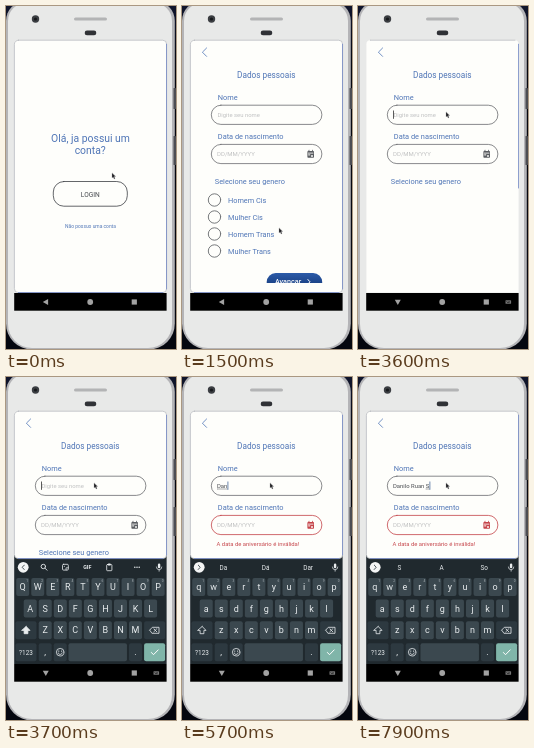
These frames come from a looping animation (170x343 px, 8 s). An HTML page with a canvas:

```html
<!DOCTYPE html>
<html lang="pt">
<head>
<meta charset="utf-8">
<style>
html, body { margin: 0; width: 100%; height: 100%; overflow: hidden; background: #05070f; }
canvas { display: block; width: 170px; height: 343px; }
</style>
</head>
<body>
<canvas></canvas>
<script>
const LOOP = 8000, STEP = 100;
const BLUE = '#4f75b6', INK = '#46494e', RED = '#c5444a', PAPER = '#fefefb', NAV = '#a2a2a2', KEY = '#e9edef';
const EDGE = '#7489c4';

const canvas = document.querySelector('canvas');
const ratio = window.devicePixelRatio || 1;
canvas.width = 170 * ratio;
canvas.height = 343 * ratio;
const c = canvas.getContext('2d');
c.scale(ratio, ratio);
c.lineCap = c.lineJoin = 'round';

function paint(fill, stroke, width = 0.8) {
  if (fill) { c.fillStyle = fill; c.fill(); }
  if (stroke) { c.strokeStyle = stroke; c.lineWidth = width; c.stroke(); }
}
function box(x, y, w, h, r, fill, stroke, width) {
  c.beginPath();
  c.roundRect(x, y, w, h, r);
  paint(fill, stroke, width);
}
function dot(x, y, r, fill, stroke, width) {
  c.beginPath();
  c.arc(x, y, r, 0, 7);
  paint(fill, stroke, width);
}
function path(points, fill, stroke, width) {
  c.beginPath();
  for (let i = 0; i < points.length; i += 2) c.lineTo(points[i], points[i + 1]);
  if (fill) c.closePath();
  paint(fill, stroke, width);
}
function text(s, x, y, size, color, align = 'left', weight = 400) {
  c.font = `${weight} ${size}px Roboto, sans-serif`;
  c.textAlign = align;
  c.fillStyle = color;
  c.fillText(s, x, y);
  return c.measureText(s).width;
}
function fade(x0, y0, x1, y1, ...colors) {
  const g = c.createLinearGradient(x0, y0, x1, y1);
  colors.forEach((color, i) => g.addColorStop(i / (colors.length - 1), color));
  return g;
}

// Latest value of a [time, value] list
const at = (list, t) => list.reduce((v, [when, next]) => t >= when ? next : v, null);

const typed = [[0, ''], [3900, 'D'], [4700, 'Da'], [5500, 'Dan'], [6100, 'Danil'], [6400, 'Danilo'],
  [6600, 'Danilo R'], [6800, 'Danilo Ru'], [7200, 'Danilo Rua'], [7400, 'Danilo Ruan'], [7600, 'Danilo Ruan S']];
const hints = [[4500, ['D', 'De', 'Do']], [5100, ['Da', 'Dá', 'Dar']], [5900, ['Dan', 'Dá', 'Dar']],
  [6400, ['Danilo', 'DANILO', 'danilo.prates']], [7200, ['Rua', 'Ruas', 'Ruan']],
  [7500, ['e', 'de', 'da']], [7800, ['S', 'A', 'So']]];
const route = [[100, 106, 167], [300, 114, 172], [500, 117, 184], [700, 111, 204], [900, 101, 220], [1100, 97, 222],
  [1600, 97, 222], [1700, 99, 174], [1800, 101, 128], [1900, 101, 128], [2100, 93, 113], [2300, 88, 106]];

function phone() {
  c.fillStyle = fade(0, 0, 0, 60, '#10152c', '#05070f');
  c.fillRect(0, 0, 170, 343);
  box(0, -5, 168.8, 348.5, [20, 20, 26, 26], '#b4b4b7');
  box(167.5, 82, 2.5, 21, 0.5, '#4c4d52');
  box(167.5, 130, 2.5, 29, 0.5, '#4c4d52');
  box(2, -3, 164, 345, [18, 18, 24, 24], '#e8e9e8');
  dot(29.5, 13, 3.7, '#3b3e42');
  dot(29.5, 13, 1.6, '#17191c');
  box(68, 11.5, 33, 3, 1.5, '#b3b4b5');
  box(78.7, 24.6, 11.6, 4.6, 2.3, '#303236');
}

function navBar(t) {
  c.fillStyle = '#000';
  c.fillRect(8.2, 287, 152.4, 17.7);
  c.save();
  c.translate(39.8, 296);
  c.rotate(t < 3200 ? 0 : t < 3300 ? -Math.PI / 4 : -Math.PI / 2);
  path([-3, 0, 2.3, -3, 2.3, 3], NAV);
  c.restore();
  dot(84.2, 296, 2.9, NAV);
  c.fillStyle = NAV;
  c.fillRect(125.7, 293.4, 5.2, 5.2);
  if (t >= 2800) {
    box(147.5, 294.2, 5.6, 3.6, 0.6, '#777');
    c.fillStyle = '#000';
    for (let i = 0; i < 3; i++) c.fillRect(148.5 + i * 1.4, 295, 0.6, 0.6);
    c.fillRect(149, 296.5, 2.6, 0.5);
  }
}

function welcome() {
  text('Olá, ja possui um', 84.5, 136, 10.4, BLUE, 'center');
  text('conta?', 84.2, 148.1, 10.4, BLUE, 'center');
  box(47.3, 175.5, 74, 24.7, 10.5, null, '#3d3f44');
  text('LOGIN', 84.3, 190.5, 6.6, INK, 'center');
  text('Não possuo uma conta', 84.5, 222.2, 4.93, BLUE, 'center');
}

function calendar(color) {
  box(125.4, 144.9, 6.6, 6.8, 0.8, color);
  path([126.9, 144.1, 126.9, 145], null, color, 0.8);
  path([130.5, 144.1, 130.5, 145], null, color, 0.8);
  c.fillStyle = PAPER;
  c.fillRect(126, 146.7, 5.4, 0.8);
  c.fillRect(126.2, 148.4, 2, 1);
  c.fillRect(129, 149.3, 2, 1.4);
}

function nameField(t) {
  box(29.3, 99.2, 110.6, 19.2, 9.6, null, '#6b6d70');
  const s = at(typed, t);
  if (!s) text('Digite seu nome', 35.5, 111, 5.9, '#bfc0c1');
  const w = s ? text(s, 35, 111, 5.9, INK) : 0;
  if (t >= 4200) {
    const last = s.slice(s.lastIndexOf(' ') + 1);
    const lw = c.measureText(last).width;
    path([35 + w - lw, 112, 35 + w, 112], null, '#56585c', 0.5);
  }
  if (t >= 2300 && (t < 2800 || t >= 3300)) {
    c.fillStyle = t < 3900 ? '#333' : '#4b6c9c';
    c.fillRect(35.2 + w, 104.5, 0.8, 8.3);
  }
}

function form(t) {
  const bad = t >= 4400;
  path([24.6, 42, 20.4, 46.2, 24.6, 50.4], null, BLUE, 0.8);
  text('Dados pessoais', 84.3, 71.8, 8.25, BLUE, 'center');
  text('Nome', 35.8, 94, 7.4, BLUE);
  nameField(t);
  text('Data de nascimento', 35.8, 133, 7.4, BLUE);
  box(29.3, 138.4, 110.6, 19.2, 9.6, null, bad ? RED : '#6b6d70');
  text('DD/MM/YYYY', 35, 150.2, 6, '#bfc0c1');
  calendar(bad ? RED : '#5a5d61');
  if (bad) text('A data de aniversário é inválida!', 34.5, 169, 5.9, RED);
  else text('Selecione seu genero', 32.8, 177.6, 7.4, BLUE);
  if (t >= 3600) return;
  ['Homem Cis', 'Mulher Cis', 'Homem Trans', 'Mulher Trans'].forEach((s, i) => {
    const y = 194 + i * 17;
    dot(32.5, y, 6.2, null, '#55585c');
    text(s, 46, y + 2.7, 7.35, BLUE);
  });
  c.save();
  c.beginPath();
  c.rect(80, 262, 65, 15);
  c.clip();
  box(84.7, 267, 55.5, 19, 9, fade(0, 267, 0, 280, '#2c5ba8', '#173d80'));
  text('Avançar', 93, 278.3, 7.2, '#fff', 'left', 500);
  path([125.8, 273.5, 128, 275.8, 125.8, 278.1], null, '#fff', 1);
  c.restore();
}

function toolbar(t) {
  const words = at(hints, t);
  dot(17.2, 190.3, 5.4, '#f4f5f5');
  const d = words ? 1 : -1;
  path([17.2 - d, 188.1, 17.2 + d, 190.3, 17.2 - d, 192.5], null, '#39444a', 0.9);
  box(151.9, 186.5, 2.4, 4.8, 1.2, KEY);
  c.beginPath();
  c.arc(153.1, 190, 2.7, 0, Math.PI);
  paint(null, KEY, 0.7);
  path([153.1, 192.8, 153.1, 194.2], null, KEY, 0.7);
  if (!words) {
    dot(37.3, 189.5, 2.2, null, KEY, 0.9);
    path([39, 191.2, 41, 193.2], null, KEY, 0.9);
    box(56.5, 187.3, 5.8, 5.8, 1, null, KEY);
    path([60, 193, 60, 190.8, 62.2, 190.8], null, KEY, 0.7);
    dot(58.3, 189.3, 0.5, KEY);
    text('GIF', 81.3, 192.3, 5.4, KEY, 'center', 700);
    box(100.7, 187.5, 5.2, 6.2, 0.7, null, KEY);
    box(102, 186.5, 2.6, 2, 0.5, KEY);
    for (let i = 0; i < 3; i++) dot(128.8 + i * 2.2, 190.3, 0.75, KEY);
    return;
  }
  words.forEach((s, i) => {
    const mail = s.includes('.');
    text(s, 41.3 + i * 42.4, mail ? 188.8 : 192.6, mail ? 5.5 : 6.4, KEY, 'center', mail ? 700 : 400);
    if (mail) text('@mail.test', 126, 194.8, 4.6, KEY, 'center');
  });
}

function key(x, y, w, label, size = 9, fill = '#3b484f') {
  box(x - w / 2, y - 9, w, 18, 2, fill);
  if (label) text(label, x, y + 3, size, KEY, 'center');
}

function keyboard(t) {
  const dark = '#2d3940';
  c.fillStyle = '#20292e';
  c.fillRect(8.2, 178, 152.4, 109);
  toolbar(t);
  [['qwertyuiop', 16.7, 210], ['asdfghjkl', 24.2, 231.5], ['zxcvbnm', 39.2, 253.3]].forEach(([row, x, y], r) => {
    [...row].forEach((ch, i) => {
      const kx = x + i * 15.05;
      key(kx, y, 13, t < 4000 ? ch.toUpperCase() : ch);
      if (!r) text((i + 1) % 10, kx + 4.5, y - 4.7, 3.2, '#aab2b6', 'center');
    });
  });
  key(20, 253.3, 21, '', 0, dark);
  path([20, 249.3, 24, 253.4, 21.9, 253.4, 21.9, 256.7, 18.1, 256.7, 18.1, 253.4, 16, 253.4],
    t < 4000 ? KEY : dark, KEY, 0.8);
  key(148.6, 253.3, 21, '', 0, dark);
  path([143.5, 253.3, 146.3, 250.3, 153, 250.3, 153, 256.3, 146.3, 256.3], dark, KEY, 0.8);
  path([147.8, 251.8, 150.8, 254.8], null, KEY, 0.8);
  path([150.8, 251.8, 147.8, 254.8], null, KEY, 0.8);

  const y = 275.2;
  key(20, y, 21, '?123', 6.4, dark);
  key(39.2, y, 13, ',', 9, dark);
  key(54.2, y, 13, '', 0, dark);
  dot(54.2, y, 3.8, null, KEY);
  dot(52.8, y - 1.1, 0.6, KEY);
  dot(55.6, y - 1.1, 0.6, KEY);
  c.beginPath();
  c.arc(54.2, y + 0.3, 2, 0.2, Math.PI - 0.2);
  paint(null, KEY, 0.7);
  key(91.7, y, 58.5);
  key(129.5, y, 13, '.', 9, dark);
  key(148.6, y, 21, '', 0, '#80b5a9');
  path([145.3, y + 0.2, 147.5, y + 2.5, 152.2, y - 2.3], null, '#fff', 1);
}

function pointer(t) {
  const i = route.findIndex(p => p[0] > t);
  let [, x, y] = i < 0 ? route[route.length - 1] : route[Math.max(0, i - 1)];
  if (i > 0) {
    const [a, b] = [route[i - 1], route[i]];
    const k = (t - a[0]) / (b[0] - a[0]);
    x += (b[1] - a[1]) * k;
    y += (b[2] - a[2]) * k;
  }
  c.save();
  c.translate(x, y);
  c.scale(0.82, 0.82);
  path([0, 0, 0, 6, 1.4, 4.9, 2.6, 7.3, 3.7, 6.8, 2.6, 4.4, 4.4, 4.3], '#232326', '#9a9a9c', 0.35);
  c.restore();
}

function screen(t) {
  const bare = t >= 3600 && t < 3700;
  const bottom = t >= 3700 ? 182 : 287;
  if (t >= 3700) keyboard(t);
  box(8.4, 34.2, 152.2, bottom - 34.6, bare ? [4, 4, 0, 0] : 4, PAPER, bare ? null : '#b3b6bc', 0.7);
  if (bare) path([12, 34.2, 157, 34.2], null, '#b3b6bc', 0.7);
  else path([12, bottom - 0.5, 157, bottom - 0.5], null, EDGE, 0.8);
  path([160.5, 38, 160.5, bare ? 182 : bottom - 4], null, EDGE, 0.8);
  const shown = Math.min(1, Math.max(0, (t - 1200) / 300));
  c.globalAlpha = 1 - shown;
  if (shown < 1) welcome();
  c.globalAlpha = shown;
  if (shown) form(t);
  c.globalAlpha = 1;
}

function draw(now) {
  const t = Math.floor(now % LOOP / STEP) * STEP;
  phone();
  screen(t);
  navBar(t);
  pointer(t);
  requestAnimationFrame(draw);
}
requestAnimationFrame(draw);
</script>
</body>
</html>
```
